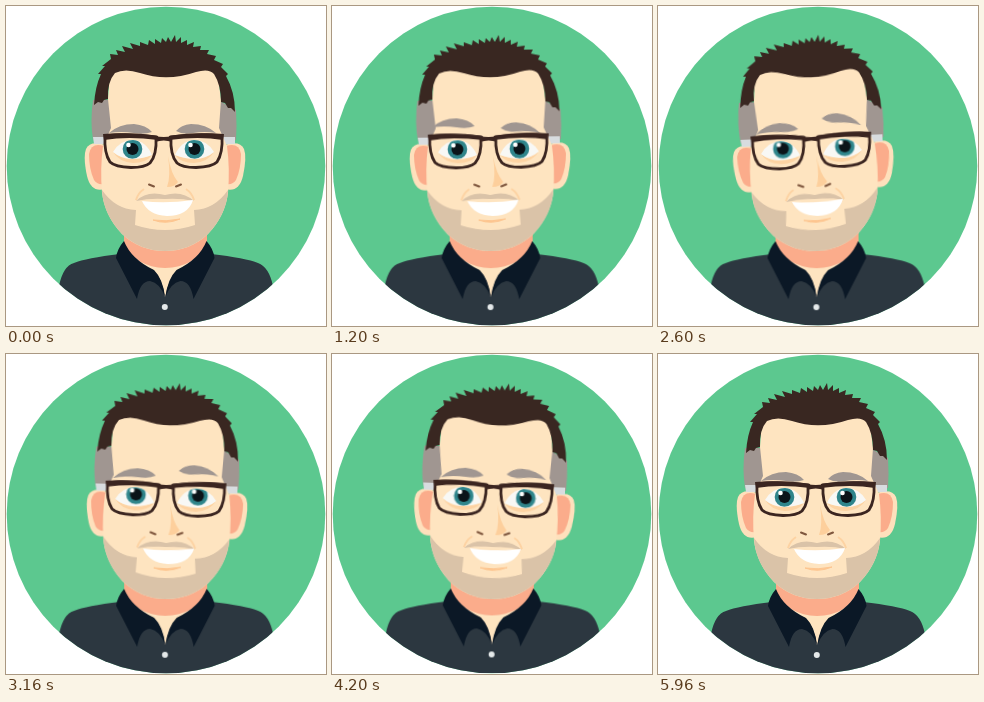
An HTML page that plays this animation: 320 px wide and 320 px high, repeating every 6000 ms.

```html
<!DOCTYPE html>
<html lang="en">
<head>
<meta charset="utf-8">
<title>Avatar</title>
<style>
html, body { margin: 0; width: 100%; height: 100%; overflow: hidden; background: #fff; }
svg { display: block; width: 100vw; height: 100vh; }
.head, .body, .gaze, .brow { animation: 6s ease-in-out infinite; }
.head { transform-origin: 158px 246px; animation-name: lean; }
.body { animation-name: sway; }
.gaze { animation-name: look; }
.brow { transform-box: fill-box; transform-origin: center; }
.brow.l { animation-name: browL; }
.brow.r { animation-name: browR; }

@keyframes lean {
  0%, 12.7%, 91.7%, 100% { transform: rotate(0deg); }
  33.3%, 42.7% { transform: rotate(-2.3deg); }
  57%, 71.7% { transform: rotate(2.1deg); }
}
@keyframes sway {
  0%, 100% { transform: translate(0, 0); }
  38% { transform: translate(-.6px, .2px); }
  66% { transform: translate(.8px, -.6px); }
}
@keyframes look {
  0%, 20%, 92%, 100% { transform: translate(0, 0); }
  33.3%, 43.3% { transform: translate(2.5px, -1.5px); }
  53% { transform: translate(1.2px, -2px); }
  70% { transform: translate(1.5px, 0); }
  81% { transform: translate(0, .3px); }
}
@keyframes browL {
  0%, 12.7%, 81%, 100% { transform: translate(0, 0); }
  19%, 24% { transform: translate(-2px, -6px); }
  33.3%, 43.3% { transform: translate(-1px, -2px) rotate(-4deg); }
  53%, 71.7% { transform: translate(1px, -3px) rotate(-3deg); }
}
@keyframes browR {
  0%, 12.7%, 81%, 100% { transform: translate(0, 0); }
  19%, 24% { transform: translate(0, -1px) rotate(5deg); }
  33.3%, 43.3% { transform: translate(-1px, -9px) rotate(9deg); }
  53% { transform: translate(0, -7px) rotate(4deg); }
  71.7% { transform: translate(0, -4px) rotate(3deg); }
}
</style>
</head>
<body>
<svg viewBox="0 0 320 320">
  <defs>
    <clipPath id="disc"><circle cx="160" cy="160" r="159.3"/></clipPath>
    <path id="lens" d="M99 130Q122 127 150 131Q151 149 144 157Q139 161.500 125 161.500Q109 161 104 156Q98 147 99 130Z"/>
    <path id="bar" d="M97 128Q122 126 152 130V134Q122 130 98 134Z"/>
    <path id="white" d="M107 146Q114 134 127 134Q140 135 146 149Q136 153 125 153Q114 152 107 146Z"/>
    <path id="bag" d="M107 146Q114 152 125 153Q136 153 146 149Q140 157 127 157Q113 156 107 146Z"/>
    <clipPath id="eyeL"><use href="#white"/></clipPath>
    <clipPath id="eyeR"><use href="#white" transform="matrix(-1 0 0 1 315 0)"/></clipPath>
    <g id="iris">
      <circle r="9.800" fill="#2f858b"/>
      <circle r="6" fill="#0b1419"/>
      <circle cx="-4" cy="-4" r="2.300" fill="#fff"/>
    </g>
    <g id="eye">
      <use href="#bag" fill="#fdd3a3"/>
      <use href="#white" fill="#f8f8f5"/>
    </g>
    <g id="frame" fill="#3b2520">
      <use href="#lens" fill="none" stroke="#3b2520" stroke-width="2.800"/>
      <use href="#bar"/>
    </g>
  </defs>

  <g clip-path="url(#disc)">
    <rect width="320" height="320" fill="#5cc88f"/>

    <g class="body">
      <path d="M53 280Q57 260 68 257Q80 252 114 248H205Q240 252 252 257Q263 261 267 280V325H53Z" fill="#2c3740"/>
      <path d="M118 226H201V242Q192 256 172 264Q163 272 159 291Q156 272 147 264Q126 256 118 242Z" fill="#fee4c0"/>
      <path d="M118 226H201V238Q189 261 159 262Q130 261 118 238Z" fill="#fbac8b"/>
      <path id="collar" d="M118 235Q111 243 110 252L131 293Q134 275 144 275Q154 277 159 291Q157 273 148 264Q125 253 118 235Z" fill="#0b1826"/>
      <use href="#collar" transform="matrix(-1 0 0 1 318.500 0)"/>
      <circle cx="158.800" cy="301" r="3" fill="#e5e9ea"/>
    </g>

    <g class="head">
      <path d="M100 139Q84 134 80 143Q77 151 81 170Q85 187 99 183Z" fill="#fee0bc"/>
      <path d="M218 139Q234 134 238 143Q241 151 237 170Q233 187 219 183Z" fill="#fee0bc"/>
      <path d="M98 140Q85 136 83 148Q83 163 88 174Q91 179 98 178Z" fill="#fbac8b"/>
      <path d="M220 140Q233 136 235 148Q235 163 230 174Q227 179 220 178Z" fill="#fbac8b"/>
      <path d="M87 94H106V134H87Q84 115 87 94Z" fill="#a09691"/>
      <path d="M212 94L230 104Q231 120 230 134H211Z" fill="#a09691"/>
      <path d="M87 131H100V138H88ZM216 131H229V138H216Z" fill="#d8dcdf"/>

      <path id="face" d="M102 93L104 66Q112 61 122 63H196Q208 61 212 70L215 94L213 122L221 140Q224 162 222 187Q219 210 202 228Q184 245 159 245Q134 245 116 228Q99 210 96 187Q94 162 97 140L105 122Z" fill="#fee4c0"/>
      <path d="M96 184Q109 203 130 204L129 219Q144 224 159 224Q174 224 189 219L188 204Q209 203 222 184Q221 208 202 228Q184 245 159 245Q134 245 116 228Q97 208 96 184Z" fill="#dac3a8"/>
      <path d="M130 195Q141 184 159 189Q176 184 188 195Q174 192 159 193Q144 192 130 195Z" fill="#dac3a8"/>
      <path d="M138 183Q132 187 130 194M180 183Q186 187 188 194" fill="none" stroke="#fdd3a3" stroke-width="2"/>
      <path d="M136 195Q160 198 187 194Q182 210 161 210Q142 209 136 195Z" fill="#fff"/>
      <path d="M147 214Q160 219 174 213Q160 216 147 214Z" fill="#fdc58f" stroke="#fdc58f"/>

      <path d="M162 150Q165 168 172 176Q169 181 161 181Q165 171 162 150Z" fill="#fdcf9c"/>
      <path d="M143 178.500L148 180.500M175 178.500L170 180.500" stroke="#80583f" stroke-width="2" stroke-linecap="round"/>

      <path d="M88 99Q89 81 95 68L92 68L99 60L96 60L105 53L104 48L112 49L110 44L119 46L116 40L127 43L124 37L134 40L134 36L142 39L143 34L149 38L149 33L155 37L156 32L160 36L162 31L165 36L169 29L170 36L175 31L175 37L181 34L181 39L188 36L187 41L195 40L194 44L203 44L201 48L210 50L208 54L217 58L215 61L222 68L220 70Q229 86 229 106L225 102L222 102L219 97L215 96Q215 79 208 68Q203 62 190 66Q161 76 134 67Q119 62 109 67Q101 76 102 93L98 94L96 97L92 96Z" fill="#392721"/>

      <path class="brow l" d="M103 127Q113 118 128 118Q140 119 146 126Q138 129 128 127Q115 125 103 127Z" fill="#a09691"/>
      <path class="brow r" d="M210 127Q200 118 185 118Q175 119 170 125Q177 129 187 127Q199 125 210 127Z" fill="#a09691"/>

      <use href="#eye"/>
      <use href="#eye" transform="matrix(-1 0 0 1 315 0)"/>
      <g clip-path="url(#eyeL)"><g class="gaze"><use href="#iris" x="126.500" y="143"/></g></g>
      <g clip-path="url(#eyeR)"><g class="gaze"><use href="#iris" x="188.500" y="143"/></g></g>

      <use href="#frame"/>
      <use href="#frame" transform="matrix(-1 0 0 1 315 0)"/>
      <path d="M149 130Q158 132 166 130V136Q158 133 149 136Z" fill="#3b2520"/>
    </g>
  </g>
</svg>
</body>
</html>
```
